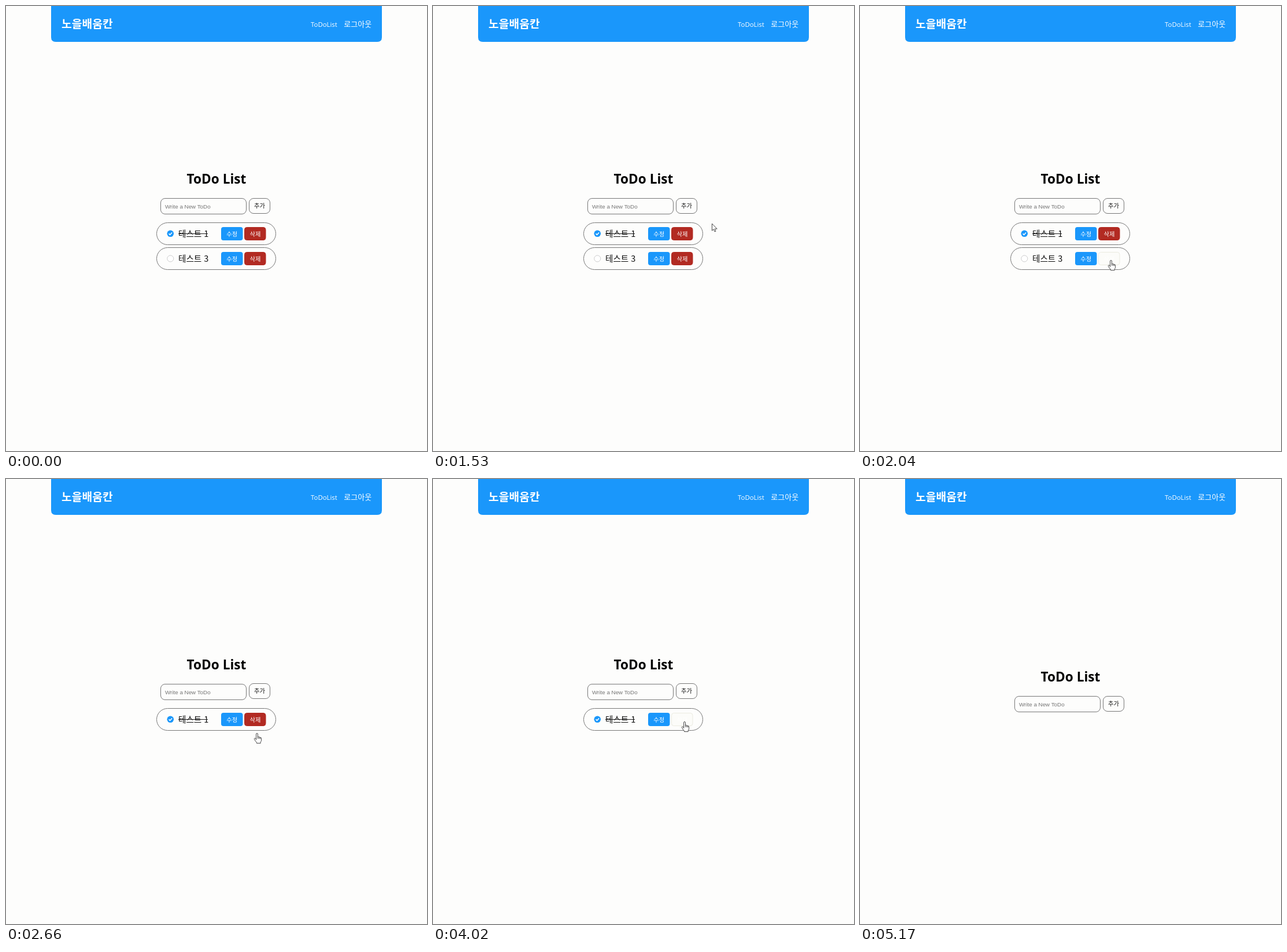
An HTML page that plays this animation: 728x769 px, repeating every 5210 ms.

```html
<!DOCTYPE html>
<html lang="ko">
<head>
<meta charset="utf-8">
<title>ToDo List</title>
<style>
html, body { margin: 0; width: 100%; height: 100%; overflow: hidden; background: #fdfdfc; }
svg { display: block; width: 100vw; height: 100vh; }
text { font-family: "Noto Sans CJK KR", "Noto Sans CJK", sans-serif; }
.latin { font-family: "Open Sans", "Noto Sans", sans-serif; }
.mid { text-anchor: middle; }
.box { fill: #fdfdfc; stroke: #777; }
.label { font-size: 10.3px; fill: #fff; text-anchor: middle; }
</style>
</head>
<body>
<svg viewBox="0 0 728 769">
  <path d="M78 0H650V54Q650 62 642 62H86Q78 62 78 54Z" fill="#1a97fb"/>
  <g fill="#fff">
    <text x="96" y="37.5" font-size="19.3" font-weight="700">노을배움칸</text>
    <text class="latin" x="527" y="35.5" font-size="11.4">ToDoList</text>
    <text x="584.3" y="36" font-size="13">로그아웃</text>
  </g>
  <g id="page">
    <text class="latin mid" x="364" y="306.5" font-size="22.6" font-weight="700">ToDo List</text>
    <rect class="box" x="267.5" y="332.5" width="148" height="27" rx="7.5"/>
    <text x="275" y="349.5" font-size="9.8" fill="#757575" style="font-family:'Liberation Sans',Arial,sans-serif">Write a New ToDo</text>
    <g id="add">
      <rect class="box" x="420.5" y="332.5" width="36" height="26" rx="7.5"/>
      <text class="mid" x="438.5" y="349.3" font-size="10.3" fill="#111">추가</text>
    </g>
    <g id="rows"></g>
  </g>
  <g id="cursor" stroke="#333" stroke-width="0.9" stroke-linejoin="round" stroke-linecap="round">
    <path id="arrow" fill="#fff" d="M.5 .5V12.2L3.2 9.8L5.1 14L7 13.2L5.2 9.1H8.8Z"/>
    <g id="hand">
      <path fill="#fff" d="M-1.4 11V1.8Q-1.4 .5 0 .5T1.4 1.8V6.6Q2.6 5.6 3.6 7.1Q5 6.3 5.7 7.8Q7.6 7.4 7.6 9.4V12.6Q7.4 14.3 6.2 15.4V17.6H-.6V16.2Q-2.6 14.4-4.6 10.6Q-5 9-3.6 8.8Q-2.6 8.8-1.4 11Z"/>
      <path fill="none" d="M1.4 6.6V9.4M3.6 7.2V9.6M5.7 7.9V10"/>
    </g>
  </g>
</svg>
<script>
const LOOP = 5210;
const ROW_PITCH = 43;
const SHIFT = [43, 22, 0];   // page offset by number of rows
const $ = id => document.getElementById(id);

const tick = `<circle cx="284.3" cy="393.3" r="5.8" fill="#1a97fb"/>
  <path d="M281.6 393.4L283.6 395.4L287.1 391.4" fill="none" stroke="#fff" stroke-width="1.5"/>`;
const ring = '<circle cx="284.3" cy="393.5" r="5.5" fill="#fff" stroke="#ccc"/>';

function rowMarkup(text, done, i) {
  return `<g transform="translate(0 ${i * ROW_PITCH})">
    <rect class="box" x="260.5" y="374.5" width="206" height="38" rx="19"/>
    ${done ? tick : ring}
    <text x="298" y="398.5" font-size="14.6" font-weight="300" fill="#111">${text}</text>
    ${done ? '<path d="M298 393.5H349" stroke="#222"/>' : ''}
    <rect x="372" y="382" width="37.5" height="23" rx="4" fill="#1a97fb"/>
    <text class="label" x="390.7" y="397.6">수정</text>
    <rect class="del" x="412.5" y="382.5" width="36.5" height="22" rx="4"/>
    <text class="label" x="430.9" y="397.6">삭제</text>
  </g>`;
}

$('rows').innerHTML = rowMarkup('테스트 1', true, 0) + rowMarkup('테스트 3', false, 1);
const rowEls = [...$('rows').children];
const delEls = rowEls.map(r => r.querySelector('.del'));

// Each pointer move: start, end, number of steps, path
const moves = [
  [480, 570, 4, [[719, 352], [606, 362], [516, 371], [482, 375]]],
  [1530, 2040, 16, [[482, 376], [476, 383], [455, 406], [440, 420], [437, 428], [434, 436], [434, 439]]],
  [3590, 4110, 13, [[434, 441], [434, 449], [435, 434], [435, 419], [435, 421]]],
  [4210, 4210, 1, [[435, 420]]],
  [4590, 4590, 1, [[435, 418]]],
  [5060, 5170, 5, [[438, 415], [462, 403], [505, 384], [560, 358], [590, 340]]]
];

const rowCount = t => t < 2660 ? 2 : t < 4480 ? 1 : 0;

function along(points, p) {
  const f = p * (points.length - 1);
  const i = Math.min(Math.floor(f), Math.max(points.length - 2, 0));
  const a = points[i], b = points[i + 1] || a;
  return a.map((v, k) => v + (b[k] - v) * (f - i));
}

function pointerAt(t) {
  const move = moves.filter(m => m[0] <= t).pop();
  if (!move || t >= 5170) return null;
  const [start, end, steps, points] = move;
  if (steps === 1) return { pos: points[0], time: start };
  const dt = (end - start) / (steps - 1);
  const k = Math.min(steps - 1, Math.floor((t - start) / dt + 1e-6));
  return { pos: along(points, k / (steps - 1)), time: start + k * dt };
}

function hoveredRow([x, y], count) {
  if (x < 412 || x > 449.5) return -1;
  for (let i = 0; i < count; i++) {
    const top = 382 + SHIFT[count] + i * ROW_PITCH;
    if (y >= top && y <= top + 23) return i;
  }
  return -1;
}

function draw(t) {
  const count = rowCount(t);
  const pointer = pointerAt(t);
  const hover = pointer ? hoveredRow(pointer.pos, count) : -1;

  $('page').setAttribute('transform', `translate(0 ${SHIFT[count]})`);
  $('add').setAttribute('transform', `translate(0 ${count === 1 ? -1 : 0})`);
  rowEls.forEach((el, i) => {
    el.style.display = i < count ? '' : 'none';
    delEls[i].setAttribute('fill', i === hover ? '#fcfcf9' : '#b22a22');
    delEls[i].setAttribute('stroke', i === hover ? '#ebebe0' : '#b22a22');
  });

  $('cursor').style.display = pointer ? '' : 'none';
  if (!pointer) return;
  // The shape only updates when the pointer moves
  const isHand = hoveredRow(pointer.pos, rowCount(pointer.time)) >= 0;
  const [x, y] = pointer.pos.map(Math.round);
  $('cursor').setAttribute('transform', `translate(${x} ${y})`);
  $('arrow').style.display = isHand ? 'none' : '';
  $('hand').style.display = isHand ? '' : 'none';
}

const began = performance.now();
function loop() {
  draw((performance.now() - began) % LOOP);
  requestAnimationFrame(loop);
}
draw(0);
requestAnimationFrame(loop);
</script>
</body>
</html>
```
